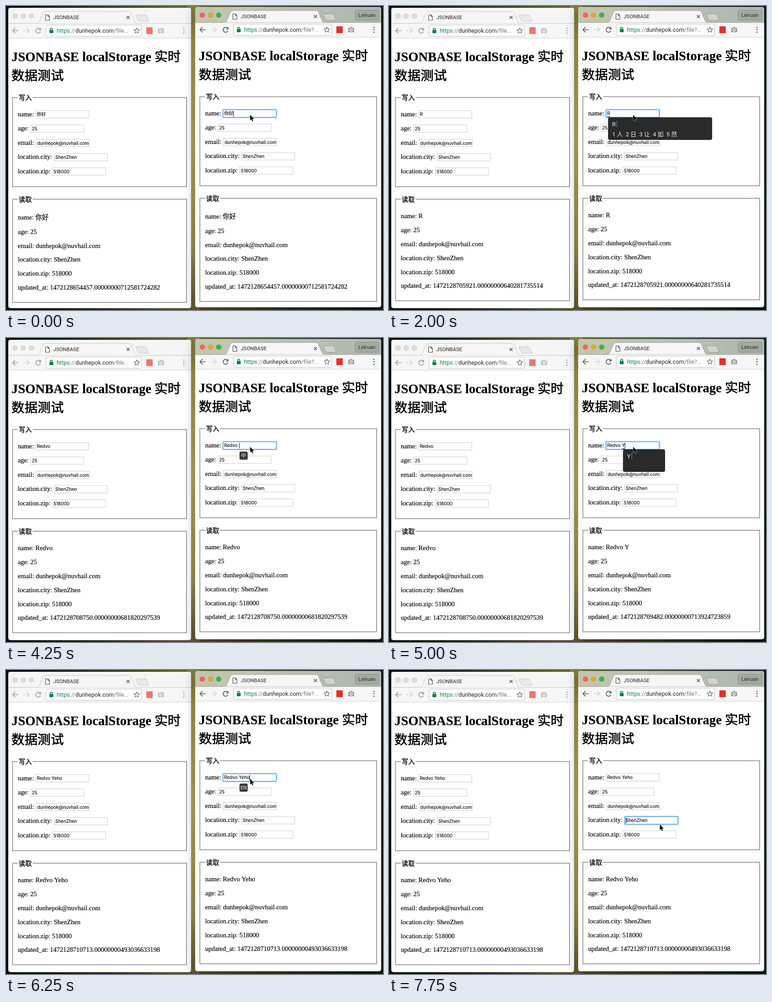
Animation, 833 px wide and 672 px high, one loop 8 s. Source, as an HTML page:

```html
<!DOCTYPE html>
<html lang="zh">
<head>
<meta charset="utf-8">
<title>JSONBASE</title>
<style>
  html, body { margin: 0; width: 100%; height: 100%; overflow: hidden; background: #0c1712; }
  svg { display: block; }
  text { font: 14.5px "Liberation Serif", "Noto Sans CJK SC", "Noto Sans CJK", serif; fill: #000; stroke: #000; stroke-width: .2px; }
  .h1 { font-size: 28.9px; font-weight: bold; }
  .cjk { font-weight: 400; stroke-width: .6px; }
  .legend { stroke-width: .35px; }
  .field { font: 10px Inter, "Noto Sans CJK SC", "Noto Sans CJK", sans-serif; stroke-width: .12px; }
  .ui { font: 11.5px Roboto, sans-serif; fill: #222; stroke: none; }
  .url { font: 12.8px Roboto, sans-serif; fill: #777; stroke: none; }
  .ime { font: 13px Roboto, "Noto Sans CJK SC", "Noto Sans CJK", sans-serif; fill: #eee; stroke: none; }
  .badge { font-size: 11px; text-anchor: middle; }
  .line { fill: none; stroke: #949494; stroke-width: 1.8; }
  .icon { fill: none; stroke-width: 1.7; }
  .window { filter: drop-shadow(0 4px 6px rgba(0,0,0,.3)); }
  .window.active { filter: drop-shadow(0 8px 12px rgba(0,0,0,.42)); }
</style>
</head>
<body>
<svg id="stage" width="833" height="672" viewBox="0 0 833 672"></svg>
<script>
const USER = 'dunhepok', FIRST = 'Redvo', FULL = 'Redvo Yeho';
const MAIL = `${USER}@nuvhail.com`;
const INPUTS = [
  ['name', 65, ''], ['age', 54, '25'], ['email', 66, MAIL],
  ['location.city', 106, 'ShenZhen'], ['location.zip', 102, '518000']
];
const inputY = i => 230.7 + 31.6 * i;
const $ = id => document.getElementById(id);

const text = (x, y, s, cls = '', id = '') =>
  `<text x="${x}" y="${y}" class="${cls}" ${id && `id="${id}"`}>${s}</text>`;
const rect = (x, y, w, h, attrs) =>
  `<rect x="${x}" y="${y}" width="${w}" height="${h}" ${attrs}/>`;

function toolbar(active, extra) {
  const ink = active ? '#555' : '#999';
  const icon = (d, color = ink) => `<path class="icon" stroke="${color}" d="${d}"/>`;
  const lights = active ? ['#f9615a', '#d9ae33', '#37b544'] : ['#dcdcdc', '#dcdcdc', '#dcdcdc'];
  const edge = active ? '#959c90' : '#c4c4c4';
  const tab = 'M67 38.5C74 38 74 34 77 27L82 15Q83 12 87 12H271Q275 12 276 15L282 29C285 36 285 38 291 38.5';
  return lights.map((c, i) =>
      `<circle cx="${20 + 18 * i}" cy="22" r="5.6" fill="${c}" stroke="#0002" stroke-width=".8"/>`).join('') +
    `<path d="M${active ? 4 : 5} 38.5H${409 + extra}" stroke="${edge}"/>
    <path d="${tab}" fill="#f6f6f6" stroke="${edge}"/>
    <path d="M288 19.5H308Q310 19.5 311 21.5L315.5 33.5H296Q293 33.5 292 31L287 21Q286.5 19.5 288 19.5Z"
      fill="${active ? '#d0d4cb' : '#e8e8e8'}" stroke="${edge}"/>
    <path d="M87.5 19.5H92.5L96 23V31.5H87.5ZM92.5 19.5V23H96" fill="#fff" stroke="#444" stroke-width="1.2"/>` +
    text(104.5, 29, 'JSONBASE', 'ui') +
    icon('M266.5 22L273 28.5M273 22L266.5 28.5', '#555') +
    icon('M27 54.5H15M20.5 48.5L14.5 54.5L20.5 60.5') +
    icon('M39 54.5H51M45.5 48.5L51.5 54.5L45.5 60.5', '#d2d2d2') +
    icon('M75.5 51A5.5 5.5 0 1 0 76.5 56.5') +
    `<path d="M77.5 48V53.5H72Z" fill="${ink}"/>` +
    rect(88.5, 42, 211 + extra, 25, 'rx="3" fill="#fff" stroke="#bdbdbd"') +
    rect(96, 53, 8.5, 7, 'rx="1" fill="#0b8043"') +
    icon('M97.8 53V51.5A2.4 2.4 0 0 1 102.6 51.5V53', '#0b8043') +
    text(112, 59, `<tspan fill="#0b8043">https</tspan>://<tspan fill="#222">${USER}.com</tspan>/file${active ? '?' : ''}...`, 'url') +
    `<g transform="translate(${extra})">
      <path d="M289 48.5L290.7 52.4 295 52.8 291.8 55.6 292.7 59.8 289 57.6 285.3 59.8 286.2 55.6 283 52.8 287.3 52.4Z"
        fill="none" stroke="#666" stroke-width="1.2"/>` +
      rect(310, 47, 14, 15, `fill="${active ? '#e2302c' : '#ec7771'}"`) +
      `<path d="M336 50.5H339L340.5 48.5H344.5L346 50.5H349V60H336Z" fill="${active ? '#999' : '#bbb'}"/>
      <circle cx="342.5" cy="55" r="2.8" fill="none" stroke="#fff" stroke-width="1.4"/>` +
      [49, 54.5, 60].map(y => `<circle cx="393" cy="${y}" r="1.4" fill="${ink}"/>`).join('') +
    '</g>';
}

function browser(id, active, dx, dy, extra) {
  const left = active ? 4 : 5, width = 409 + extra - left;
  const lineW = 384.5 + extra;
  const legend = (y, s) => rect(26, y - 8, 33, 14, 'fill="#fff"') + text(28, y + 5.4, s, 'legend');
  const inputs = INPUTS.map(([label, x, value], i) => {
    const y = inputY(i);
    return text(26, y + 12.8, label + ':') +
      rect(x + .5, y + .5, 117.5, 16.5, 'fill="#fff" stroke="#c9c9c9"') +
      text(x + 3, y + 12.6, value, 'field', i ? '' : id + 'Input');
  }).join('');
  const rows = ['age: 25', 'email: ' + MAIL, 'location.city: ShenZhen', 'location.zip: 518000', '']
    .map((s, i) => text(26, 500.2 + 30.8 * i, s, '', i == 4 ? id + 'Stamp' : '')).join('');
  return `<g transform="translate(${dx} ${dy})">
    <g class="window ${active ? 'active' : ''}">` +
      rect(left, 4, width, 664, 'rx="5" fill="#fff"') +
      `<path d="M${left} 71V9Q${left} 4 ${left + 5} 4H${left + width - 5}Q${left + width} 4 ${left + width} 9V71Z"
        fill="${active ? 'url(#bar)' : '#f5f5f5'}"/>
    </g>` +
    rect(left, 39, width, 32, 'fill="#f6f6f6"') +
    rect(left, 70.5, width, 1, 'fill="#cfcfcf"') +
    toolbar(active, extra) +
    text(12, 121.7, 'JSONBASE localStorage <tspan class="cjk">实时</tspan>', 'h1') +
    text(12, 163.7, '数据测试', 'h1 cjk') +
    rect(14.4, 202.4, lineW, 197, 'class="line"') + legend(203, '写入') + inputs +
    rect(14.4, 427, lineW, 224.5, `class="line" id="${id}Box"`) + legend(428, '读取') +
    text(26, 469, '', '', id + 'Name') +
    `<g id="${id}Rows">${rows}</g></g>`;
}

const stops = list => list.map(([o, c]) => `<stop offset="${o}" stop-color="${c}"/>`).join('');
$('stage').innerHTML = `<defs>
    <linearGradient id="bar">${stops([[0, '#c5c4ac'], [.3, '#bfc4b5'], [1, '#aeb7ae']])}</linearGradient>
    <linearGradient id="gold" x2="0" y2="1">${stops([[0, '#8a7f3a'], [.12, '#b3a750'], [.45, '#c8bd66'], [.8, '#aea254'], [1, '#6b6230']])}</linearGradient>
    <linearGradient id="ground">${stops([[0, '#04100d'], [.2, '#252b19'], [.45, '#6b622f'], [.65, '#4a4827'], [1, '#0b1a16']])}</linearGradient>
  </defs>` +
  rect(0, 0, 833, 672, 'fill="url(#ground)"') +
  rect(400, 0, 28, 672, 'fill="url(#gold)"') +
  browser('l', false, 0, 0, 0) + browser('r', true, 414, -2, 6) +
  rect(771.5, 9.5, 52, 22, 'rx="3" fill="#a4aaa1" stroke="#868c81"') +
  '<text x="797.5" y="24.3" class="ui" text-anchor="middle">Leiruan</text>' +
  `<g id="focus" fill="none">
    ${rect(-.5, -.5, 119.5, 18.5, 'rx="2.5" stroke="#a9d0f7" stroke-width="2"')}
    ${rect(.5, .5, 117.5, 16.5, 'rx="1" stroke="#62a8ee" stroke-width="1.5"')}
  </g>` +
  rect(0, 0, 1, 12, 'id="caret"') +
  rect(0, 244, 0, 1, 'id="under"') +
  `<g id="popup">
    <rect id="popupBox" y="246" height="50" rx="4" fill="#222" fill-opacity=".96"/>
    ${text(9, 265.5, '', 'ime', 'typed')}
    ${rect(0, 254, 1, 14, 'id="typedCaret" fill="#888"')}
    ${text(9, 287.5, '', 'ime', 'choices')}
  </g>
  <g id="badge">${rect(0, 251, 18, 18, 'rx="3" fill="#3a3a3a"')}${text(9, 264, '', 'ime badge', 'mode')}</g>
  <path id="cursor" d="M.5 .5V13L3.2 10.500 5.200 15 7.100 14.200 5.200 9.800H9Z" stroke="#fff" paint-order="stroke"/>`;

const page = (name, stamp) => ({ name, stamp: '1472128' + stamp });
const before = page('你好', '654457.00000000712581724282');
const half = page('你', '705203.00000000718204415630');
const empty = page('', '705497.00000000719758827986');
const r1 = page('R', '705921.00000000640281735514');
const r2 = page('R', '707044.0000000000598544089');
const r3 = page('Red', '707449.00000000653726723539');
const r4 = page('Redv', '707690.00000000517390264418');
const r5 = page(FIRST, '707937.00000000622817450937');
const spaced = page(FIRST + ' ', '708750.00000000681820297539');
const y1 = page(FIRST + ' Y', '709482.00000000713924723859');
const y2 = page(FIRST + ' Ye', '709801.00000000570318842716');
const y3 = page(FULL, '710052.00000000638172940451');
const done = page(FULL, '710713.00000000493036633198');

const rPopup = { x: 484, w: 230, typed: 'R', choices: '1 人  2 日  3 让  4 如  5 然' };
const yPopup = typed => ({ x: 517, w: 330, typed, choices: '1 也  2 夜  3 叶  4 业  5 页  6 野  7 爷' });

// Each step overrides part of the state that precedes it.
const STEPS = [
  [0, { l: before, r: before, caret: true, field: 0, popup: null, mode: '', modeX: 484, under: 0, mouse: [539, 240] }],
  [250, { caret: false }],
  [750, { r: half, caret: true }],
  [1000, { r: empty }],
  [1250, { popup: { x: 484, w: 94, typed: 'R', choices: '' } }],
  [1500, { r: r1, l: empty, popup: rPopup, under: 1 }],
  [1750, { l: r1 }],
  [2000, { caret: false }],
  [2500, { caret: true }],
  [2750, { r: r2, l: r2, popup: null, under: 0, mode: 'EN' }],
  [3000, { r: r3 }],
  [3250, { r: r4, l: r3 }],
  [3500, { r: r5, l: r5, mode: '' }],
  [3750, { caret: false }],
  [4000, { r: spaced, caret: true }],
  [4250, { l: spaced, mode: '中', modeX: 516 }],
  [4750, { mode: '', popup: { x: 517, w: 93, typed: 'Y', choices: '' } }],
  [5000, { r: y1, under: 1 }],
  [5250, { r: y2, l: y1, popup: yPopup('Ye') }],
  [5500, { r: y3, l: y2, popup: yPopup('Yeho') }],
  [5750, { l: y3 }],
  [6250, { r: done, l: done, popup: null, under: 0, mode: 'EN' }],
  [6750, { caret: false, mode: '' }],
  [7000, { mouse: [556, 270] }],
  [7250, { caret: true, mouse: [584, 318] }],
  [7500, { mouse: [598, 341] }],
  [7750, { field: 3 }]
];

const move = (el, x, y) => el.setAttribute('transform', `translate(${x} ${y})`);
const show = (el, on) => el.setAttribute('visibility', on ? 'visible' : 'hidden');
const put = (id, s) => { $(id).textContent = s.replace(/ /g, '\u00a0'); };
const widthOf = id => $(id).textContent ? $(id).getComputedTextLength() : 0;

function fill(id, { name, stamp }) {
  const tall = /[^\x00-\x7f]/.test(name);
  put(id + 'Input', name);
  put(id + 'Name', 'name: ' + name);
  put(id + 'Stamp', 'updated_at: ' + stamp);
  $(id + 'Name').setAttribute('y', tall ? 471.6 : 469.2);
  move($(id + 'Rows'), 0, tall ? 3.6 : 0);
  $(id + 'Box').setAttribute('height', tall ? 228.1 : 224.5);
}

function render(s) {
  fill('l', s.l);
  fill('r', s.r);
  const x = 414 + INPUTS[s.field][1], y = inputY(s.field) - 2;
  move($('focus'), x + .3, y + .2);
  const caretX = x + 3 + (s.field ? 0 : widthOf('rInput'));
  move($('caret'), Math.round(caretX), Math.round(y + 3));
  show($('caret'), s.caret);
  const start = s.r.name.startsWith(FIRST) ? 515 : 482;
  $('under').setAttribute('x', start);
  $('under').setAttribute('width', s.under ? Math.max(0, caretX - start) : 0);
  show($('popup'), s.popup);
  if (s.popup) {
    put('typed', s.popup.typed);
    put('choices', s.popup.choices);
    move($('popup'), s.popup.x, 0);
    $('popupBox').setAttribute('width', s.popup.w);
    $('typedCaret').setAttribute('x', Math.round(widthOf('typed') + 11));
  }
  show($('badge'), s.mode);
  put('mode', s.mode);
  move($('badge'), s.modeX, 0);
  move($('cursor'), ...s.mouse);
}

let shown = 0;
function tick() {
  const t = performance.now() % 8000;
  const past = STEPS.filter(([at]) => at <= t);
  if (past.length !== shown) {
    shown = past.length;
    render(Object.assign({}, ...past.map(step => step[1])));
  }
  requestAnimationFrame(tick);
}
tick();
</script>
</body>
</html>
```
